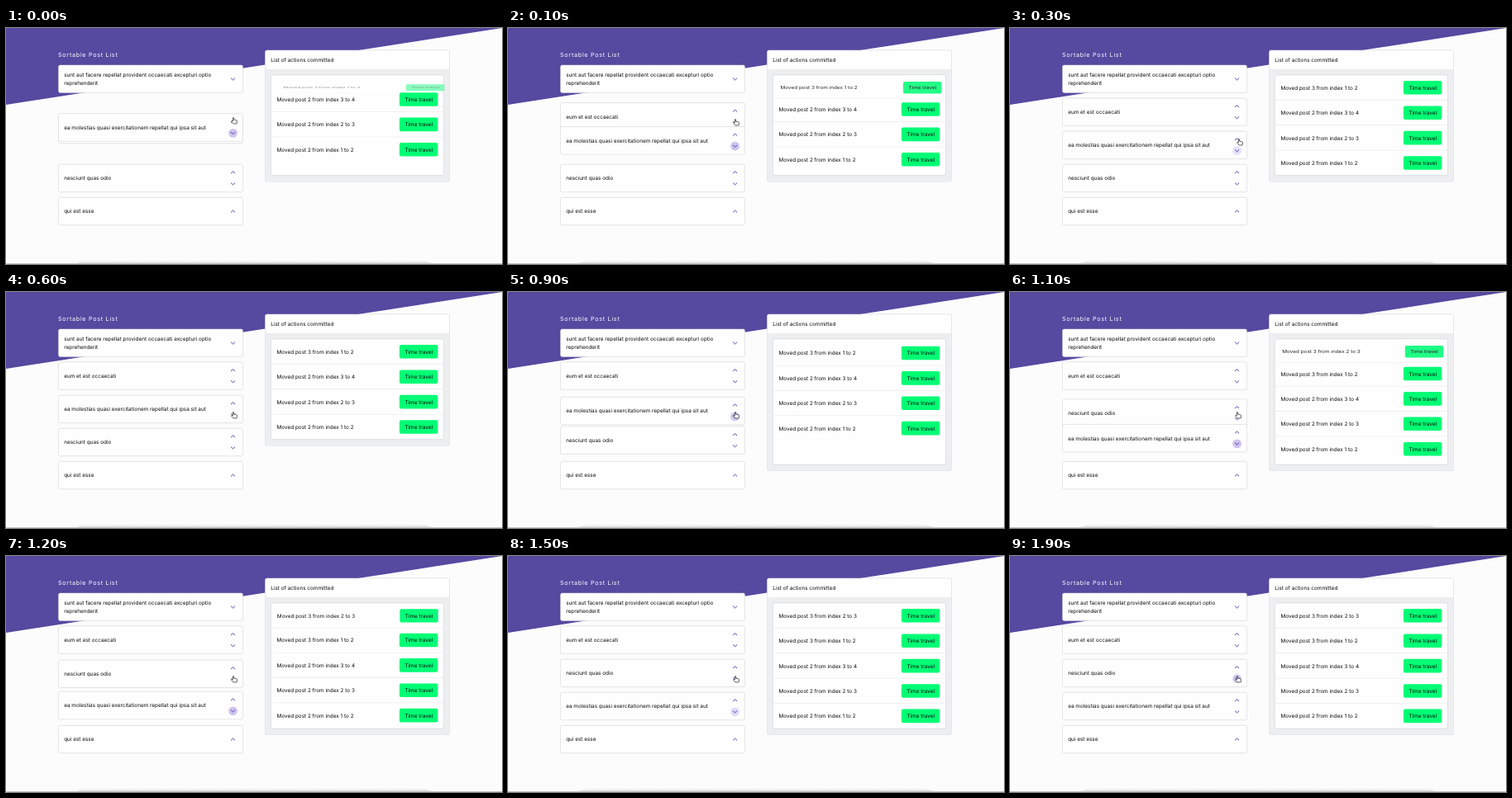
An HTML page for the animation above (2 s loop, 600 by 286 pixels).

```html
<!DOCTYPE html>
<html lang="en">
<head>
<meta charset="utf-8">
<title>Sortable post list</title>
<style>
  html, body { margin: 0; width: 100%; height: 100%; overflow: hidden; background: #fcfcfc; }
  svg { display: block; width: 600px; height: 286px; }
  text { font: 6.4px Inter, "Open Sans", sans-serif; fill: #080808; text-rendering: geometricPrecision; }
  .title { font-size: 7.2px; letter-spacing: .1em; fill: #fff; }
  .box { fill: #fefefe; stroke: #dfe0e2; stroke-width: .5; filter: drop-shadow(0 .6px .6px rgba(0, 0, 0, .2)); }
  .body { fill: #eceeef; }
  .line { fill: #e6e7e9; }
  .button { fill: #00fc75; }
  .chevron { fill: none; stroke: #4a3cb0; stroke-width: 1; }
  .ring { fill: #cdc4ee; }
  .hand { fill: #fff; stroke: #222; stroke-width: .7; stroke-linejoin: round; }
</style>
</head>
<body>
<svg viewBox="0 0 600 286">
  <defs>
    <linearGradient id="shade" x2="0" y2="1">
      <stop offset="0" stop-color="#000" stop-opacity="0"/>
      <stop offset="1" stop-color="#000" stop-opacity=".12"/>
    </linearGradient>
  </defs>
  <rect width="600" height="286" fill="#fcfcfc"/>
  <path d="M0 0H600L0 93Z" fill="#5549a0"/>
  <text class="title" x="63" y="35.2">Sortable Post List</text>
  <g id="posts"></g>
  <rect id="panel" class="box" x="313.5" y="27" width="223" rx="2"/>
  <rect id="panelBody" class="body" x="313.8" y="50.5" width="222.4" rx="1.5"/>
  <rect class="line" x="313.8" y="50.2" width="222.4" height=".6"/>
  <text x="320.3" y="41.3">List of actions committed</text>
  <rect id="list" class="box" x="320.5" y="57" width="209" rx="2"/>
  <g id="actions"></g>
  <path d="M85 285L95 281.5H505L515 285Z" fill="url(#shade)"/>
  <rect y="285" width="600" height="1" fill="#c6c6c6"/>
  <path id="hand" class="hand" d="M-1.6 1V-3.2Q-1 -4.2 -.4 -3.2V-.9L2.4 -.3Q3.7 0 3.6 1.2L3 4H-.9L-3.3 1.2Q-3.4 .2 -2.5 .4Z"/>
</svg>
<script>
const LOOP = 2000, STEP = 100, MOVE_TIME = 500;
const FIRST_MOVE = -180, SECOND_MOVE = 810;
const POST_TOP = 45, POST_PITCH = 40.1, POST_HEIGHT = 33.4;
const LIST_TOP = 57, ROW = 30.4;
const $ = id => document.getElementById(id);

function add(parent, tag, attrs = {}, content = '') {
  const node = document.createElementNS('http://www.w3.org/2000/svg', tag);
  for (const key in attrs) node.setAttribute(key, attrs[key]);
  node.textContent = content;
  return parent.appendChild(node);
}

// cubic-bezier(.55, 0, .1, 1), solved by bisection
function ease(x) {
  if (x <= 0) return 0;
  if (x >= 1) return 1;
  let low = 0, high = 1, s = .5;
  for (let i = 0; i < 24; i++) {
    s = (low + high) / 2;
    const r = 1 - s;
    if (1.65 * r * r * s + .3 * r * s * s + s * s * s < x) low = s; else high = s;
  }
  return s * s * (3 - 2 * s);
}

// Linear interpolation between [time, value] stops
function track(t, stops) {
  const next = stops.findIndex(stop => stop[0] > t);
  if (next === 0) return stops[0][1];
  if (next < 0) return stops[stops.length - 1][1];
  const [t0, a] = stops[next - 1], [t1, b] = stops[next];
  return a + (b - a) * (t - t0) / (t1 - t0);
}

function makePost(lines, up, down) {
  const post = add($('posts'), 'g');
  add(post, 'rect', { class: 'box', x: 63.5, width: 223, height: POST_HEIGHT, rx: 2 });
  lines.forEach((line, i) =>
    add(post, 'text', { x: 70.2, y: 19.1 + (i - (lines.length - 1) / 2) * 10 }, line));
  const both = up && down;
  const ring = add(post, 'circle', { class: 'ring', cx: 274.6, cy: 23.5, r: 5.4, opacity: 0 });
  const chevron = (y, dir) =>
    add(post, 'path', { class: 'chevron', d: `M272.1 ${y - dir * 1.2}l2.5 ${dir * 2.4}l2.5 ${-dir * 2.4}` });
  if (up) chevron(both ? 9.7 : 16.8, -1);
  if (down) chevron(both ? 23.5 : 16.8, 1);
  return { ring, place: slot => post.setAttribute('transform', `translate(0 ${POST_TOP + slot * POST_PITCH})`) };
}

function makeAction([post, from, to], i, all) {
  const row = add($('actions'), 'g');
  add(row, 'text', { x: 327.5, y: 2.6 }, `Moved post ${post} from index ${from} to ${to}`);
  add(row, 'rect', { class: 'button', x: 476, y: -8.2, width: 46.4, height: 16.6, rx: 2 });
  add(row, 'text', { x: 499.2, y: 2.6, 'text-anchor': 'middle' }, 'Time travel');
  if (i < all.length - 1) add(row, 'rect', { class: 'line', x: 320.8, y: 14.9, width: 208.4, height: .6 });
  return (slot, shown = 1) => {
    const y = LIST_TOP + (slot + .5) * ROW;
    row.setAttribute('transform', `translate(${15 * (1 - shown)} ${y}) scale(1 ${.01 + .99 * shown})`);
    row.setAttribute('opacity', shown);
  };
}

const top1 = makePost(['sunt aut facere repellat provident occaecati excepturi optio', 'reprehenderit'], false, true);
const eum = makePost(['eum et est occaecati'], true, true);
const nesciunt = makePost(['nesciunt quas odio'], true, true);
const ea = makePost(['ea molestias quasi exercitationem repellat qui ipsa sit aut'], true, true);
const last = makePost(['qui est esse'], true, false);
top1.place(0);
last.place(4);

const actions = [[3, 2, 3], [3, 1, 2], [2, 3, 4], [2, 2, 3], [2, 1, 2]].map(makeAction);

function draw(t) {
  const first = ease((t - FIRST_MOVE) / MOVE_TIME);
  const second = ease((t - SECOND_MOVE) / MOVE_TIME);

  eum.place(2 - first);
  nesciunt.place(3 - second);
  ea.place(1 + first + second);
  ea.ring.setAttribute('opacity',
    track(t, [[100, 1], [300, .5], [500, 0], [600, 0], [800, 1], [1300, 1], [1500, .6], [1700, 0]]));
  nesciunt.ring.setAttribute('opacity', track(t, [[1700, 0], [1900, .9]]));

  actions[0](0, second);
  actions[1](second, first);
  actions.slice(2).forEach((place, i) => place(i + first + second));

  const listHeight = ROW * (t >= SECOND_MOVE ? 5 : 4);
  $('list').setAttribute('height', listHeight);
  $('panel').setAttribute('height', listHeight + 37.4);
  $('panelBody').setAttribute('height', listHeight + 13.6);

  const x = track(t, [[0, 276], [100, 276], [300, 278], [500, 276]]);
  const y = track(t, [[0, 112], [100, 114], [300, 138], [500, 149]]);
  $('hand').setAttribute('transform', `translate(${x} ${y})`);
}

function tick() {
  draw(Math.floor(performance.now() % LOOP / STEP) * STEP);
  requestAnimationFrame(tick);
}
tick();
</script>
</body>
</html>
```
